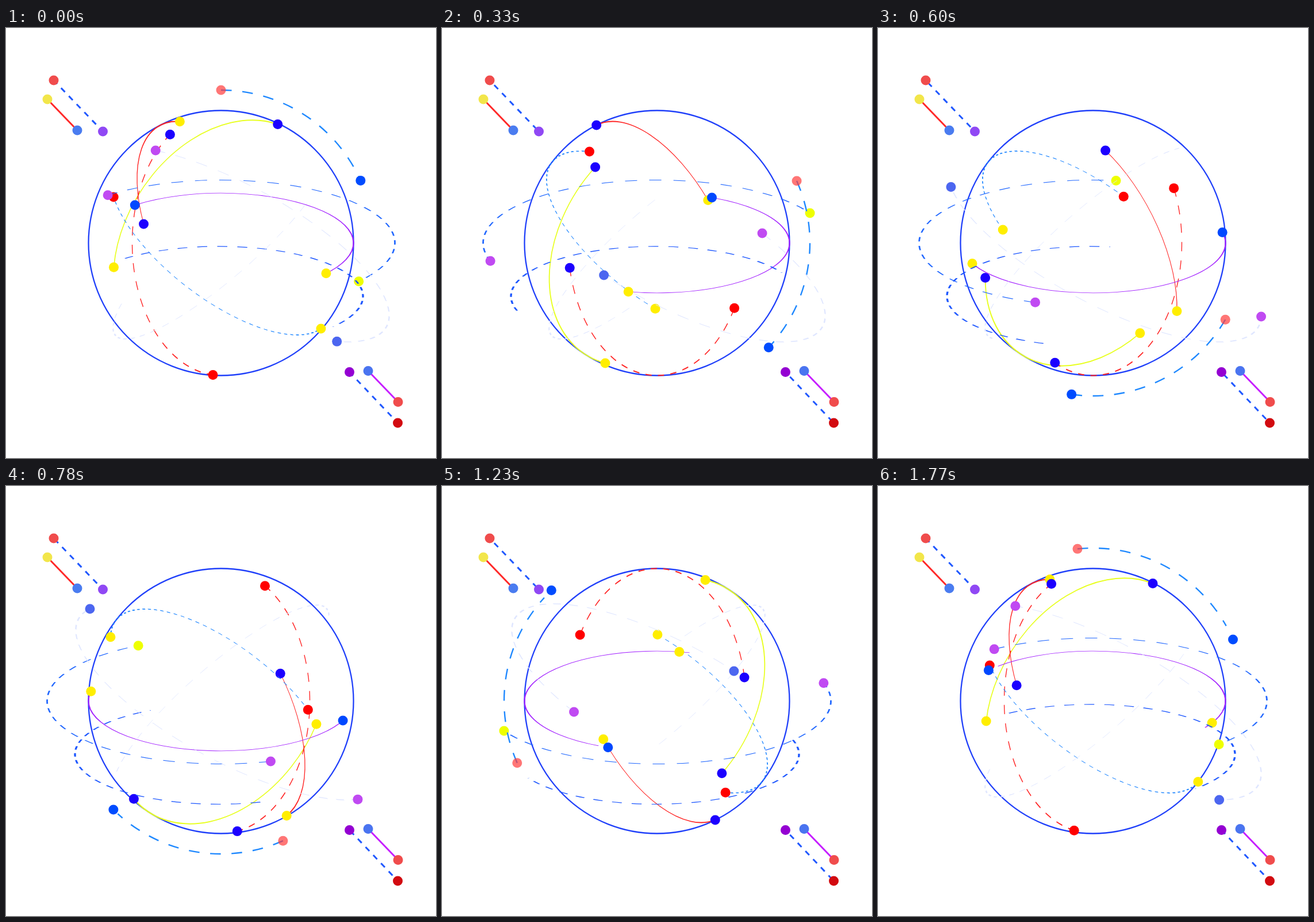
Animation, 748 px wide and 748 px high, one loop 1.8 s. Source, as an HTML page with a canvas:

```html
<!DOCTYPE html>
<html lang="en">
<head>
<meta charset="utf-8">
<title>Orbits</title>
<style>
html, body { margin: 0; width: 100%; height: 100%; overflow: hidden; background: #fff; }
canvas { display: block; width: 748px; height: 748px; }
</style>
</head>
<body>
<canvas id="stage" width="748" height="748"></canvas>
<script>
const ctx = document.getElementById('stage').getContext('2d');
const LOOP = 1800, STEP = 30, MID = 374, RAD = Math.PI / 180, DOT = 8.5;

// Angles in degrees, speeds in degrees per ms.
// arc: [start, span, speed]; dots: [colour, angle, speed]; dash: period in degrees
const orbits = [
  { a: 230.5, b: 166.2, tilt: -57.2, color: '#e8ff20', width: 2.2,
    arc: [-126.3, 116.3, -.2023],
    dots: [['#ffee00', -126.3, -.2023], ['#1c00ff', -10, -.2023]] },
  { a: 230.5, b: 113.7, tilt: 62.8, color: '#ff2424', width: 2,
    arc: [113.2, 83.6, .2025],
    dots: [['#ffee00', 196.8, .2025], ['#1c00ff', 113.2, .2025]] },
  { a: 154.5, b: 230.5, color: '#ff2424', width: 2, dash: 8,
    arc: [95.2, 139.8, -.1994],
    dots: [['#ff0000', 95.2, -.1994], ['#1c00ff', 235, -.1994]] },
  { a: 230.5, b: 96.6, tilt: 37.5, color: '#2288ff', width: 2.2, dash: 4,
    arc: [7.3, 141.4, .1993],
    dots: [['#ffee00', 7.3, .1993], ['#ff0000', 148.7, .1993]] },
  { a: 230.5, b: 86.8, color: '#a322ff', width: 2.2,
    arc: [230.2, 168, .2],
    dots: [['#ffee00', 37.5, .1969], ['#0048ff', 229.5, .1969]] },
  { a: 302.5, b: 109.5, color: '#2268ff', width: 2.8, dash: 8,
    arc: [229.4, 168.3, -.2],
    dots: [['#eeff00', 37.6, -.2], ['#c04af2', 229.4, -.2]] },
  { x: 370.5, y: 466.7, a: 250.5, b: 86.8, color: '#1e58ff', width: 3.4, dash: 8,
    arc: [229.3, 168.3, -.2], dots: [] },
  { a: 266, b: 266, color: '#1e88ff', width: 2.4, dash: 8,
    arc: [-90, 66.4, .2001],
    dots: [['rgba(255,60,60,.7)', -90, .2001], ['#004cff', -24.1, .2036]] },
  { a: 244, b: 60, tilt: -41.2, color: '#dfe6ff', width: 2.6, dash: 8,
    arc: [51, 165.5, .2], dots: [] },
  { x: 394, y: 375.5, a: 304.2, b: 104.2, tilt: 28.2, color: '#dfe6ff', width: 2.6, dash: 8,
    arc: [230.2, 168, .2],
    dots: [['#4c66f0', 37.8, .2004], ['#c04af2', 230.2, .2004]] }
];

// Corner links: x1, y1, x2, y2, line colour, end colours, dashed
const links = [
  [83, 91, 168.5, 180, '#2058ff', '#f04c4c', '#9048f4', true],
  [72, 124, 124, 178, '#ff2828', '#f2e64a', '#4a7cf0', false],
  [597.5, 598.5, 681.5, 687, '#2058ff', '#9400d2', '#d20a10', true],
  [630, 596.5, 682, 650.5, '#c61eff', '#4a74f0', '#f04c4c', false]
];

function dot(x, y, color) {
  ctx.fillStyle = color;
  ctx.beginPath();
  ctx.arc(x, y, DOT, 0, 2 * Math.PI);
  ctx.fill();
}

function drawOrbit(o, t) {
  const { x = MID, y = MID, a, b, tilt = 0 } = o;
  const r = Math.max(a, b), phi = tilt * RAD;
  const [start, span, speed] = o.arc;
  const from = (start + speed * t) * RAD;

  // The squash also thins the stroke and shortens the dashes.
  ctx.save();
  ctx.translate(x, y);
  ctx.rotate(phi);
  ctx.scale(a / r, b / r);
  ctx.strokeStyle = o.color;
  ctx.lineWidth = o.width;
  if (o.dash) {
    const half = o.dash / 2 * RAD * r;
    ctx.setLineDash([half, half]);
  }
  ctx.beginPath();
  ctx.arc(0, 0, r, from, from + span * RAD);
  ctx.stroke();
  ctx.restore();

  for (const [color, angle, rate] of o.dots) {
    const u = (angle + rate * t) * RAD;
    const px = a * Math.cos(u), py = b * Math.sin(u);
    dot(x + px * Math.cos(phi) - py * Math.sin(phi),
        y + px * Math.sin(phi) + py * Math.cos(phi), color);
  }
}

function drawLink([x1, y1, x2, y2, color, c1, c2, dashed], t) {
  const period = 19.5;
  ctx.save();
  ctx.strokeStyle = color;
  ctx.lineWidth = 3;
  if (dashed) {
    ctx.setLineDash([period / 2, period / 2]);
    ctx.lineDashOffset = 1 + 2 * period * t / LOOP;
  }
  ctx.beginPath();
  ctx.moveTo(x1, y1);
  ctx.lineTo(x2, y2);
  ctx.stroke();
  ctx.restore();
  dot(x1, y1, c1);
  dot(x2, y2, c2);
}

function draw(t) {
  ctx.fillStyle = '#fff';
  ctx.fillRect(0, 0, 748, 748);
  ctx.strokeStyle = '#2040fa';
  ctx.lineWidth = 2.3;
  ctx.beginPath();
  ctx.arc(MID, MID, 230.5, 0, 2 * Math.PI);
  ctx.stroke();
  for (const o of orbits) drawOrbit(o, t);
  for (const l of links) drawLink(l, t);
}

const begin = performance.now();
function tick() {
  const t = Math.max(0, performance.now() - begin) % LOOP;
  draw(Math.floor(t / STEP) * STEP);
  requestAnimationFrame(tick);
}
tick();
</script>
</body>
</html>
```
